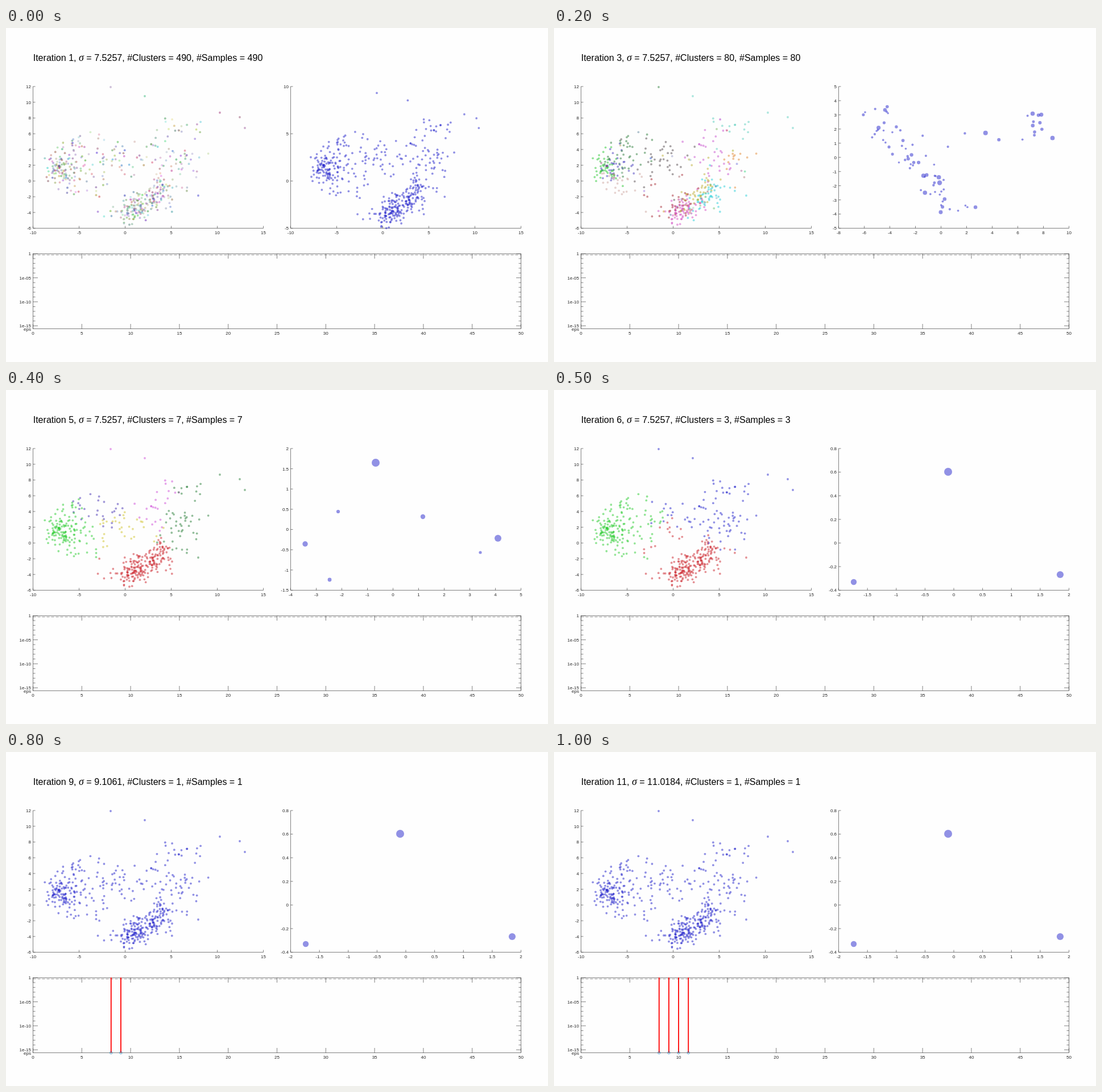
These frames come from a looping animation (953x588 px, 1.1 s). An HTML page with a canvas:

```html
<!DOCTYPE html>
<html lang="en">
<head>
<meta charset="utf-8">
<title>Clustering iterations</title>
<style>
html, body { margin: 0; width: 100%; height: 100%; overflow: hidden; background: #fefefe; }
canvas { display: block; }
</style>
</head>
<body>
<canvas id="c" width="953" height="588"></canvas>
<script>
const ctx = document.getElementById('c').getContext('2d');
const STEP = 100, STEPS = 11, TOTAL = 490;
const INK = '#262626', BLUE = 'rgb(36,36,204)';
const SANS = '"Liberation Sans", Arial, sans-serif';
const SERIF = '"Liberation Serif", "Times New Roman", serif';

function seeded(a) {
  return () => {
    a = (a + 0x6D2B79F5) | 0;
    let t = Math.imul(a ^ (a >>> 15), 1 | a);
    t = (t + Math.imul(t ^ (t >>> 7), 61 | t)) ^ t;
    return ((t ^ (t >>> 14)) >>> 0) / 4294967296;
  };
}
const gauss = r => Math.sqrt(-2 * Math.log(1 - r())) * Math.cos(2 * Math.PI * r());
const sq = a => Math.max(0, a) ** 2;

// Normal clouds: { at, spread, slope, n }, in stage pixels
function scatter(clouds, seed) {
  const r = seeded(seed), out = [];
  for (const { at, spread, slope = 0, n, keep = .85 } of clouds) {
    for (let i = 0; i < n; i++) {
      const dx = gauss(r) * spread[0];
      const y = at[1] + dx * slope + gauss(r) * spread[1];
      out.push({ x: at[0] + dx, y: y > 347 ? 694 - y : y, keep });
    }
  }
  return out;
}

// keep: share of samples left after the first merge
const samples = scatter([
  { at: [90, 248], spread: [9, 13], n: 60, keep: .25 },
  { at: [110, 252], spread: [17, 20], n: 70, keep: .25 },
  { at: [126, 203], spread: [16, 9], n: 14 },
  { at: [173, 245], spread: [18, 32], n: 32 },
  { at: [222, 322], spread: [16, 12], n: 85, keep: .4 },
  { at: [262, 296], spread: [15, 13], slope: -.3, n: 80, keep: .6 },
  { at: [235, 308], spread: [29, 14], slope: -.2, n: 45, keep: .8 },
  { at: [228, 235], spread: [27, 24], n: 30 },
  { at: [280, 235], spread: [20, 30], n: 27 },
  { at: [322, 230], spread: [17, 16], n: 25 },
  { at: [322, 170], spread: [28, 13], slope: -.2, n: 16 }
], 71);
const outliers = [[184, 104], [244, 120], [376, 149], [411, 157], [420, 176], [338, 295]];
for (const [x, y] of outliers) samples.push({ x, y, keep: 1 });
for (const s of samples) {
  s.x = Math.max(66, s.x);
  s.u = (s.x - 47.7) / 16.21 - 10;
  s.v = (352.5 - s.y) / 13.86 - 6;
}

const fine = [
  [90, 240, 'rgb(40,200,50)'], [126, 212, 'rgb(45,125,60)'], [108, 252, 'rgb(70,60,190)'],
  [112, 278, 'rgb(205,165,160)'], [185, 235, 'rgb(85,75,80)'], [200, 310, 'rgb(165,40,50)'],
  [226, 324, 'rgb(212,80,195)'], [250, 282, 'rgb(190,175,55)'], [275, 292, 'rgb(40,205,215)'],
  [278, 225, 'rgb(200,80,205)'], [335, 225, 'rgb(225,135,50)'], [330, 167, 'rgb(90,205,190)']
];
const coarse = [
  [105, 250, 'rgb(40,204,45)'], [212, 236, 'rgb(208,195,45)'], [235, 308, 'rgb(204,36,44)'],
  [320, 222, 'rgb(40,125,55)'], [345, 160, 'rgb(40,125,55)'], [174, 198, 'rgb(70,50,180)'],
  [255, 200, 'rgb(205,75,215)'], [210, 110, 'rgb(205,75,215)']
];
const three = [[105, 250, 'rgb(40,204,45)'], [235, 310, 'rgb(204,36,44)'], [275, 195, BLUE]];

// regions, position noise, share of samples still on their own
const colouring = [
  [fine, 0, 1], [fine, 22, .6], [fine, 17, .12], [fine, 13, .02],
  [coarse, 9, 0], [three, 8, 0], [[[0, 0, BLUE]], 0, 0]
];
const oddColour = r =>
  `hsl(${360 * r() | 0} ${20 + 50 * r() | 0}% ${40 + 38 * r() | 0}%)`;

const palettes = colouring.map(([regions, noise, alone], step) => {
  const r = seeded(900 + step);
  return samples.map(s => {
    const x = s.x + gauss(r) * noise, y = s.y + gauss(r) * noise, odd = oddColour(r);
    if (r() < alone) return odd;
    const far = p => Math.hypot(x - p[0], y - p[1]);
    return regions.reduce((a, b) => far(b) < far(a) ? b : a)[2];
  });
});

// Shifted samples as [x, y, radius], in stage pixels
const shiftOnce = () => samples.map(({ u, v }) => [
  500.5 + (.94 * u + .05 * v + .25 - .014 * sq(u) + 10) * 16.2,
  352.5 - (.9 * v - .01 * sq(v) + 5) * 16.63, 1.9]);

function shiftTwice() {
  const r = seeded(33);
  return samples.filter(s => r() < s.keep).map(({ u, v, keep }) => [
    500.5 + (1.5 - (u < 0 ? .9 * u : u - .022 * u * u) - .12 * v + 10) * 20.25,
    352.5 - (v * (v < 0 ? .95 : .68) - .01 * sq(v) - .1 * u + 6.3) * 17.82,
    1.7 + r() ** 3 * (keep < .7 ? 1.9 : .4)]);
}

// Merged clusters lie along a falling band, a thin bridge and a group at the right.
function merged(share, seed) {
  const r = seeded(seed + 1);
  return scatter([
    { at: [570, 175], spread: [26, 28], n: 19 * share },
    { at: [622, 222], spread: [22, 20], slope: .6, n: 20 * share },
    { at: [676, 285], spread: [18, 15], slope: .5, n: 16 * share },
    { at: [705, 319], spread: [25, 8], n: 10 * share },
    { at: [740, 192], spread: [26, 8], n: 4 * share },
    { at: [848, 174], spread: [12, 17], n: 12 * share }
  ], seed).map(({ x, y }) => [x, Math.max(105, y), 1.8 + 2.4 * r() ** 2]);
}
const seven = [[650, 128, 7], [584, 214, 3.1], [526, 271, 4.7], [569, 334, 3.4],
  [733, 223, 4.2], [865, 261, 6], [834, 286, 2.6]];
const last = [[693, 144, 7], [527, 338, 5.2], [890, 325, 6.1]];

// dots, x from/to/step, y from/to/step
const views = [
  [shiftOnce(), [-10, 15, 5], [-5, 10, 5]],
  [shiftTwice(), [-10, 10, 2], [-6, 8, 2]],
  [merged(1, 12), [-8, 10, 2], [-5, 5, 1]],
  [merged(.25, 40), [-6, 8, 2], [-4, 3, 1]],
  [seven, [-4, 5, 1], [-1.5, 2, .5]],
  [last, [-2, 2, .5], [-.4, .8, .2]]
];
const counts = [TOTAL, 284, 80, 24, 7, 3, 1];

function line(x1, y1, x2, y2) {
  ctx.beginPath();
  ctx.moveTo(x1, y1);
  ctx.lineTo(x2, y2);
  ctx.stroke();
}
function circle(x, y, r) {
  ctx.beginPath();
  ctx.arc(x, y, r, 0, 2 * Math.PI);
}
function dot(x, y, r, colour) {
  ctx.fillStyle = colour;
  circle(x, y, r);
  ctx.fill();
}
function label(text, x, y, align) {
  ctx.textAlign = align;
  ctx.fillText(text, x, y + 2.9);
}
function pen() {
  ctx.strokeStyle = ctx.fillStyle = INK;
  ctx.lineWidth = .58;
  ctx.font = '8px ' + SANS;
}
function ticks([from, to, step], draw) {
  const n = Math.round((to - from) / step);
  for (let i = 0; i <= n; i++) draw(i / n, String(+(from + i * step).toFixed(2)));
}

function axes(x, xs, ys) {
  const top = 103, bottom = 352.5, w = 405;
  pen();
  line(x, top, x, bottom);
  line(x, bottom, x + w, bottom);
  ticks(xs, (f, s) => {
    line(x + f * w, bottom, x + f * w, bottom - 4);
    label(s, x + f * w, 360.5, 'center');
  });
  ticks(ys, (f, s) => {
    const y = bottom - f * (bottom - top);
    line(x, y, x + 4, y);
    label(s, x - 3.5, y, 'right');
  });
}

function chart(step) {
  const l = 47.5, r = 905.5, t = 397.5, b = 529.5, decade = 8.45;
  pen();
  ctx.strokeRect(l, t, r - l, b - t);
  ticks([0, 50, 5], (f, s) => {
    const x = l + f * (r - l);
    line(x, b, x, b - 8.5);
    line(x, t, x, t + 8.5);
    label(s, x, 537.5, 'center');
  });
  for (let i = 0; i <= 15; i++) {
    const y = t + i * decade, len = i % 5 ? 4 : 8.5;
    line(l, y, l + len, y);
    line(r, y, r - len, y);
    if (i % 5 === 0) label(i ? '1e-' + String(i).padStart(2, '0') : '1', l - 3.5, y, 'right');
  }
  label('eps', l - 3.5, b + .5, 'right');
  ctx.lineWidth = .45;
  ctx.setLineDash([5, 3]);
  line(l, 399.6, r, 399.6);
  ctx.setLineDash([]);
  for (let i = 8; i <= step + 1; i++) {
    const x = l + i * (r - l) / 50;
    ctx.strokeStyle = '#f00';
    ctx.lineWidth = 1.8;
    line(x, t - .5, x, b - .5);
    ctx.strokeStyle = 'rgb(0,114,189)';
    ctx.lineWidth = .6;
    circle(x, b, 2.2);
    ctx.stroke();
  }
}

function title(step) {
  const sigma = (7.5257 * 1.1 ** Math.max(0, step - 6)).toFixed(4);
  const n = counts[Math.min(step, 6)];
  let x = 47.7;
  const put = (text, font) => {
    ctx.font = font;
    ctx.fillText(text, x, 57.6);
    x += ctx.measureText(text).width;
  };
  ctx.fillStyle = '#000';
  ctx.textAlign = 'left';
  put(`Iteration ${step + 1}, `, '16.06px ' + SANS);
  put('σ', 'italic 18px ' + SERIF);
  put(` = ${sigma}, #Clusters = ${n}, #Samples = ${n}`, '16.06px ' + SANS);
}

function draw(step) {
  ctx.fillStyle = '#fefefe';
  ctx.fillRect(0, 0, 953, 588);
  title(step);
  const [dots, xs, ys] = views[Math.min(step, 5)];
  axes(47.5, [-10, 15, 5], [-6, 12, 2]);
  axes(500.5, xs, ys);
  ctx.globalAlpha = .5;
  const palette = palettes[Math.min(step, 6)];
  samples.forEach((s, i) => dot(s.x, s.y, 1.9, palette[i]));
  dots.forEach(([x, y, r]) => dot(x, y, r, BLUE));
  ctx.globalAlpha = 1;
  chart(step);
}

ctx.fontKerning = 'none';
const start = performance.now();
let shown = -1;
function tick() {
  const step = Math.floor((performance.now() - start) / STEP) % STEPS;
  if (step !== shown) draw(shown = step);
  requestAnimationFrame(tick);
}
tick();
</script>
</body>
</html>
```
